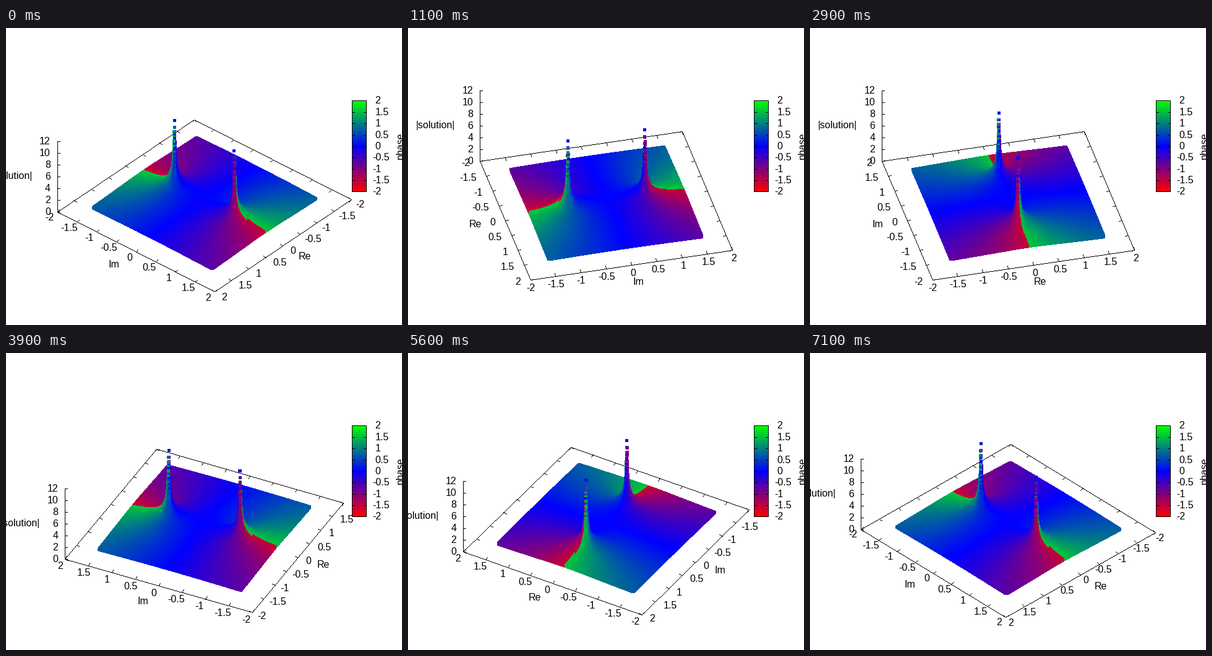
Recreate the animation shown at these times as a matplotlib script. Size 640x480 px, loop 7200 ms.

```python
import numpy as np
import matplotlib.pyplot as plt
from matplotlib.animation import FuncAnimation

W, H, DPI = 640, 480, 100
FRAMES, INTERVAL = 72, 100
CX, CY = 320.2, 287.1           # screen centre of the base plane
SX, SY, SZ = 84.15, 49.4, 9.5   # pixels per unit: across, in depth, upward
TILT = np.radians(30)
LIMIT = 1.512                   # the sheet covers -LIMIT..LIMIT both ways
POLE = 0.76112                  # branch points at +-i * POLE
Z_MAX = 12
TICKS = np.arange(-2, 2.1, 0.5)
DOT = 5

plt.rcParams["font.family"] = "Liberation Sans"
plt.rcParams["font.size"] = 16 * 72 / DPI


def palette(v):
    """Red - blue - green for values from -2 to 2."""
    t = np.clip(np.asarray(v) / 2, -1, 1)
    rgb = np.stack([np.maximum(-t, 0), np.maximum(t, 0), 1 - np.abs(t)], -1)
    return np.rint(rgb * 255).astype(np.uint8)


def to_pixel(v):
    return np.floor(np.asarray(v) + 0.5).astype(int)


def grid(count):
    side = np.linspace(-LIMIT, LIMIT, count)
    return (side[:, None] + 1j * side[None, :]).ravel()


def needs_detail(p):
    """Around the poles, along the branch cut and at the rim."""
    pole = np.minimum(abs(p - 1j * POLE), abs(p + 1j * POLE)) < 0.13
    cut = (abs(p.real) < 0.02) & (abs(p.imag) > POLE)
    rim = np.maximum(abs(p.real), abs(p.imag)) > LIMIT - 0.012
    return pole | cut | rim


sheet, dense = grid(220), grid(806)
pts = np.concatenate([sheet[~needs_detail(sheet)], dense[needs_detail(dense)]])
value = 1 / np.sqrt(pts ** 2 + POLE ** 2)
keep = abs(value) <= Z_MAX
pts, value = pts[keep], value[keep]
height, colors = abs(value), palette(np.angle(value))

span = np.arange(DOT) - DOT // 2
stamp = (span[:, None] * W + span[None, :]).ravel()


def draw_line(img, x0, y0, x1, y1):
    x0, y0, x1, y1 = to_pixel([x0, y0, x1, y1])
    n = max(abs(x1 - x0), abs(y1 - y0)) + 1
    img[to_pixel(np.linspace(y0, y1, n)), to_pixel(np.linspace(x0, x1, n))] = 0


def project(re, im, z, c, s):
    return CX + SX * (re * c + im * s), CY + SY * (re * s - im * c) - SZ * z


def draw_surface(img, c, s):
    x, y = project(pts.real, pts.imag, height, c, s)
    depth = ((pts.real * s - pts.imag * c) / 2 * np.sin(TILT)
             + height / 6 * np.cos(TILT))
    order = np.argsort(depth, kind="stable")
    cell = (to_pixel(y) * W + to_pixel(x))[order]
    owner = np.full(W * H, -1, dtype=np.int32)
    owner[(cell[:, None] + stamp).ravel()] = np.repeat(order, stamp.size)
    hit = owner >= 0
    img.reshape(-1, 3)[hit] = colors[owner[hit]]


fig = plt.figure(figsize=(W / DPI, H / DPI), dpi=DPI, facecolor="white")
ax = fig.add_axes([0, 0, 1, 1])
ax.axis("off")
stage = ax.imshow(np.full((H, W, 3), 255, np.uint8), interpolation="nearest",
                  aspect="auto", zorder=0)


def label(s, ha="center", zorder=2, **kw):
    return ax.text(0, 0, s, ha=ha, va="baseline", color="black",
                   zorder=zorder, **kw)


def place(text, x, y):
    text.set_position((x, y + 4.8))


def sign_gap(v):
    """Room kept for the missing minus sign."""
    return 0 if v < 0 else 4.4


re_ticks = [label(f"{v:g}") for v in TICKS]
im_ticks = [label(f"{v:g}") for v in TICKS]
z_values = range(0, Z_MAX + 1, 2)
z_ticks = [label(str(v), "right") for v in z_values]
re_name, im_name, z_name = label("Re"), label("Im"), label("|solution|")


def draw_colorbox(left=559, top=117, width=24, rows=148):
    ramp = palette(np.linspace(2, -2, rows))
    box = np.repeat(ramp[:, None, :], width, axis=1)
    for v in TICKS:
        row = int(np.ceil((2 - v) / 4 * (rows - 1)))
        box[row, :5] = box[row, -5:] = 0
        place(label(f"{v:g}", "left", 4), 591.5 + sign_gap(v), top + row)
    box[[0, -1]] = 0
    box[:, [0, -1]] = 0
    ax.imshow(box, interpolation="nearest", aspect="auto", zorder=3,
              extent=(left - 0.5, left + width - 0.5,
                      top + rows - 0.5, top - 0.5))
    name = label("phase", zorder=4, rotation=90, rotation_mode="anchor")
    name.set_position((641, 190))


draw_colorbox()
ax.set_xlim(-0.5, W - 0.5)
ax.set_ylim(H - 0.5, -0.5)


def draw_axis(img, at, unit, texts, name):
    """Ticks on the front edge and its mirror; at(v, side) gives a point."""
    ux, uy = np.array(unit) / np.hypot(*unit)
    ha = "left" if ux > 0.78 else "right" if ux < -0.78 else "center"
    share = {"left": 1, "center": 0.5, "right": 0}[ha]
    for v, text in zip(TICKS, texts):
        for side in (1, -1):
            x, y = at(v, side)
            draw_line(img, x, y, x - side * 5 * ux, y - side * 5 * uy)
        x, y = at(v, 1)
        text.set_ha(ha)
        place(text, x + 13 * ux - 3.5 + share * sign_gap(v), y + 13 * uy)
    for side in (1, -1):
        draw_line(img, *at(-2, side), *at(2, side))
    x, y = at(0, 1)
    place(name, x + 47 * ux - 2.5, y + 28 * uy)


def update(n):
    theta = np.radians(131 - 5 * n)
    c, s = np.cos(theta), np.sin(theta)
    front_im, front_re = -np.sign(c), np.sign(s)
    k = np.cos(TILT)
    img = np.full((H, W, 3), 255, np.uint8)

    draw_axis(img, lambda v, side: project(v, 2 * side * front_im, 0, c, s),
              (front_im * s, -front_im * c * k), re_ticks, re_name)
    draw_axis(img, lambda v, side: project(2 * side * front_re, v, 0, c, s),
              (front_re * c, front_re * s * k), im_ticks, im_name)

    # Vertical axis stands on the leftmost corner
    x, y = project(-2 * np.sign(c), -2 * np.sign(s), 0, c, s)
    draw_line(img, x, y, x, y - SZ * Z_MAX)
    for v, text in zip(z_values, z_ticks):
        draw_line(img, x, y - SZ * v, x + 4, y - SZ * v)
        place(text, x - 11.5, y - SZ * v)
    place(z_name, x - 72, y - SZ * Z_MAX / 2 - 1)

    draw_surface(img, c, s)
    stage.set_data(img)
    return [stage]


anim = FuncAnimation(fig, update, frames=FRAMES, interval=INTERVAL,
                     repeat=True, repeat_delay=0, blit=False)
plt.show()
```
